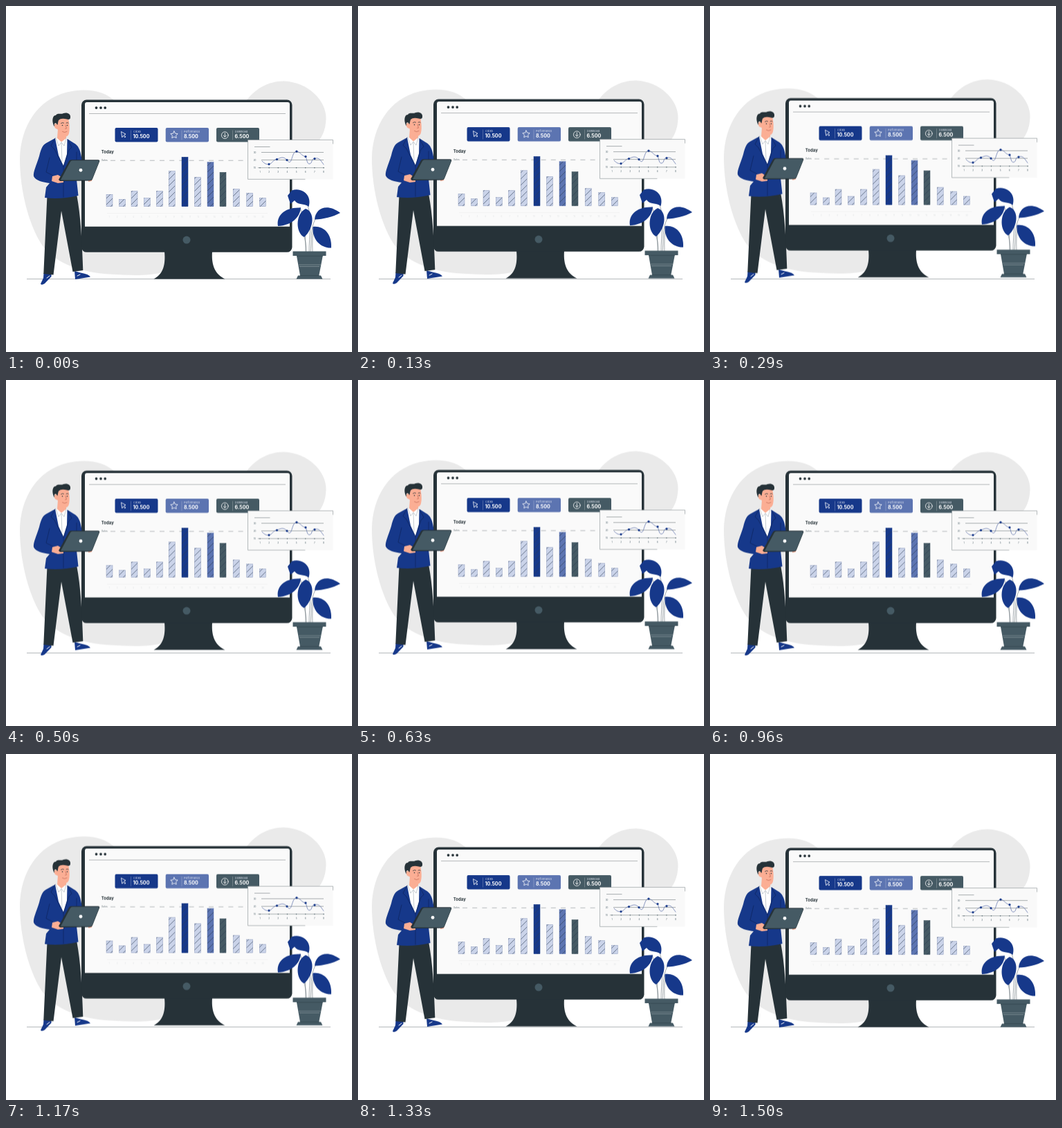
Write an HTML page that moves like this. It is 500 by 500 pixels and loops after 1540 ms.

```html
<!DOCTYPE html>
<html lang="en">
<head>
<meta charset="utf-8">
<title>Dashboard</title>
<style>
  html, body { margin: 0; width: 100%; height: 100%; overflow: hidden; background: #fff; }
  svg { display: block; width: 100vw; height: 100vh; }
  text { font-family: Inter, Roboto, sans-serif; }
  .float { animation: float 770ms cubic-bezier(.3, .12, .7, .88) -40ms infinite alternate; }
  @keyframes float {
    from { transform: translateY(.2px); }
    to { transform: translateY(-6.1px); }
  }
  .blue { fill: #16388a; }
  .dark { fill: #263238; }
  .slate { fill: #455a64; }
  .skin { fill: #fbae94; }
  .line { fill: none; stroke-linecap: round; stroke-linejoin: round; }
  .label { font-size: 3.8px; fill: #dfe4f0; }
  .value { font-size: 7.1px; font-weight: 700; fill: #fff; }
  .tiny { font-size: 3px; fill: #455a64; text-anchor: middle; }
</style>
</head>
<body>
<svg viewBox="0 0 500 500">
  <defs>
    <pattern id="hatch" width="9" height="9" patternUnits="userSpaceOnUse">
      <path d="M-1 10L10 -1M-1 1L1 -1M8 10L10 8" stroke="#2c3a50" stroke-width=".6"/>
    </pattern>
  </defs>

  <g class="float" fill="#eaeaea">
    <path d="M158 138C142 122 116 118 88 124.500C46 135 21 173 20 221C20 268 34 320 54 348C75 374 111 385 150 387.500C181 389.500 207 390 226 385L245 357V138Z"/>
    <path d="M346 139C358 120 380 108 402 108.500C436 110 463 136 462.500 163C462 180 456 191 448 200L410 240L346 200Z"/>
  </g>

  <path d="M30 394.500H469" stroke="#a3a8ab" stroke-width=".8"/>

  <g class="float">
    <!-- monitor -->
    <path class="dark" d="M229 355H298C296.500 376 303 388 316.500 394.500H213.500C226 388 231 376 229 355Z"/>
    <rect class="dark" x="109" y="135.500" width="304.500" height="220.300" rx="7.500"/>
    <path d="M114 318.800V142Q114 139 117 139H407Q410 139 410 142V318.800Z" fill="#fafafa"/>
    <circle class="slate" cx="261" cy="338" r="5.500"/>
    <g class="dark">
      <circle cx="130.500" cy="147" r="1.900"/>
      <circle cx="137" cy="147" r="1.900"/>
      <circle cx="143.200" cy="147" r="1.900"/>
    </g>
    <path d="M120 155.500H404" stroke="#989da0" stroke-width=".7"/>

    <!-- stat tiles -->
    <rect class="blue" x="157.500" y="176" width="62" height="20.500" rx="2"/>
    <rect fill="#5c74b1" x="230.700" y="176" width="62.300" height="20.500" rx="2"/>
    <rect class="slate" x="304" y="176" width="62" height="20.500" rx="2"/>
    <g class="line" stroke="#fff" stroke-width=".8">
      <path d="M166.800 181.700L173 185.200L170.500 186.300L173 189L171.800 190L169.500 187.300L168 189.500Z"/>
      <path d="M243 180.800L244.600 184.100L248.200 184.600L245.600 187.100L246.200 190.700L243 189L239.800 190.700L240.400 187.100L237.800 184.600L241.400 184.100Z"/>
      <circle cx="316.300" cy="186.700" r="4.900"/>
      <path d="M316.300 183.700V189M314.100 187L316.300 189.300L318.500 187"/>
    </g>
    <path d="M180.500 179.500V193.500M254 179.500V193.500M327.500 179.500V193.500" stroke="#fff" stroke-opacity=".4" stroke-width=".6"/>
    <text class="label" x="184" y="183.300">Clicks</text>
    <text class="label" x="257" y="183.300">Performance</text>
    <text class="label" x="331" y="183.300">Download</text>
    <text class="value" x="183.500" y="191.300">10.500</text>
    <text class="value" x="257" y="191.300">8.500</text>
    <text class="value" x="330.500" y="191.300">6.500</text>

    <!-- bar chart -->
    <text class="dark" x="137.800" y="213.300" font-size="6" font-weight="700">Today</text>
    <text x="138" y="224.300" font-size="3.400" fill="#69757b">Sales</text>
    <path d="M151 223.200H374" stroke="#6c767b" stroke-width=".5" stroke-dasharray="7 7.200"/>
    <g id="bars"></g>
    <path d="M146 299.500H378" stroke="#ececec" stroke-width=".6"/>
    <g id="days" opacity=".15"></g>

    <!-- line chart card -->
    <rect x="349.500" y="193.500" width="123" height="57" fill="#f9f9f9"/>
    <path class="line" d="M432 250.300H349.500V193.500H472.500V199" stroke="#858d91" stroke-width=".6"/>
    <path d="M359 203.500H381.500M369 211.500H459M369 222.500H459M364 233.700H460" stroke="#626c71" stroke-width=".55"/>
    <g id="axis"></g>
    <path class="line" d="M370 224C374 228 376 229 380 228.500C385 228 386 221.500 391.500 221.500C397 219 401 217 406 222.500C414 234 412 210 420 210C426 211 427 217 433 217.500C435 222 435 229 439 228C443 227 441 220 446 220.500C453 218 455 224 459 229" stroke="#5368a5" stroke-width=".7"/>
    <g id="dots" class="blue"></g>

    <!-- plant -->
    <g class="line" stroke="#657178" stroke-width=".6">
      <path d="M425 291C432 312 433 330 433 356M430 331Q434 341 434 356M436 288C443 310 438 330 438 356M447 308C439 323 442 340 440 356M445 321Q442 332 443 356"/>
    </g>
    <g class="blue">
      <path d="M407 274L413 266.500C422 263 432 267 436 274C439 279 439 285 437.500 290C430 284 423 289 417 281L411 286Z"/>
      <path d="M393 318C390 303 403 290 426 291.500C425 305 413 317 393 318Z"/>
      <path d="M433 293C446 297 446 320 431 334C419 329 417 301 433 293Z"/>
      <path d="M446 308.500C447 293 463 284 483 299C472 305 459 308 446 308.500Z"/>
      <path d="M443.500 319C458 317 471 328 470 349.500C455 350 442 338 443.500 319Z"/>
    </g>
    <path class="slate" d="M414.500 354.500H462.500V361H457.800L452.300 389.500H455L457.500 394.500H419.500L422 389.500H425L420 361H414.500Z"/>
    <path d="M420 361.300H457.800M425 389.600H452.500" stroke="#2f424b" stroke-width=".6"/>
    <path d="M423 374H455M424 376.500H453" stroke="#a4b0b5" stroke-width=".5"/>

    <!-- man -->
    <path class="blue" d="M54.500 386H65.500V391L56 401Q51 404 50 401.500L54 393ZM99 383L108 385.500Q120 387.500 122 391.500L100 395Z"/>
    <path class="line" d="M59 393L63 390M103 390L107 388" stroke="#fff" stroke-width="1"/>
    <path class="dark" d="M59.500 274L54.300 387L68.500 388.500L80 296L96.500 384L111.300 382C110 342 108 302 102 272Z"/>
    <path d="M69 191L89 191L92 232L79 234L67 220Z" fill="#fff"/>
    <path class="skin" d="M75 178L87 184V191L80 196.500L74 191Z"/>
    <path class="skin" d="M72 162H90C92 171 92.500 180 90.500 185.500Q88 190.500 82 188.500Q76 185 74.500 178Q69 177 70 171Q72 168 73.500 171Z"/>
    <path class="dark" d="M69 173C66 166 67 158 72 158C74 154 79 157 83 155C88 153 94 156 93 161C93 165 89 164 85 163Q79 162 76 165Q75 168 74.500 172L72 169Q69 169 70 174Z"/>
    <g class="dark">
      <circle cx="81.500" cy="172.500" r=".8"/>
      <circle cx="88.500" cy="172.500" r=".8"/>
    </g>
    <path class="line" d="M79.500 169.500Q81.500 167.800 83.500 169M87 169Q88.500 168 90 169" stroke="#263238" stroke-width=".8"/>
    <path class="line" d="M86 172L87.500 177L85.500 177.300M81.500 181.500Q84.500 183.700 88 181.500" stroke="#b65c48" stroke-width=".6"/>
    <path class="blue" d="M71 191L61 196.500C53 200 51 205 48 217C44 230 39 240 40 246C42 252 54 255 63 256L58 262L56 277Q78 280 104.500 274L102 251L110 225C108 208 105 202 98 198L88.500 192L88 214L83 231L76 216Z"/>
    <path class="line" d="M71 191L65 202L70 207L83 232L83 276M89 193L95 204L91 208L83 232M63 219L58 240L68 245M102 211L102 224" stroke="#0c2054" stroke-width=".6"/>
    <path class="line" d="M72 191L76 202L80 197L84 202L87 191M80 198L81 225" stroke="#8d9ba4" stroke-width=".5"/>
    <path class="skin" d="M67 246L75 244L83 249V255L75 256L66 253ZM119 248L125 247L124 253L119 254Z"/>
    <path class="dark" d="M76 251L91 224Q92 222.300 94 222.300H133Q136 222.500 135 225L125 250Q124 252.500 121 252.500L78 253Z"/>
    <path class="slate" d="M79 251.500L93 225Q94 223.200 96 223.200H133.500Q135 223.500 134.500 225L124.500 250Q124 251.500 122 251.500Z"/>
    <circle cx="108" cy="237.200" r="2.400" fill="#fff"/>
  </g>
</svg>
<script>
  const SVG = 'http://www.w3.org/2000/svg';
  function add(id, tag, attrs, text = '') {
    const el = document.createElementNS(SVG, tag);
    for (const key in attrs) el.setAttribute(key, attrs[key]);
    el.textContent = text;
    document.getElementById(id).append(el);
  }

  // left edge, top edge, fill of the strong bars
  const bars = [
    [145, 272.3], [163.5, 279.3], [181, 267.3], [199.3, 277.5], [217.5, 267.3],
    [235.2, 238.7], [254, 218.3, '#16388a'], [272.5, 247.3], [291, 225.7, '#5c74b1'],
    [309, 240.3, '#455a64'], [328.2, 264.5], [347.7, 270.3], [366.3, 277.3]
  ];
  for (const [x, y, fill] of bars) {
    const box = { x, y, width: 9, height: 289.7 - y };
    add('bars', 'rect', { ...box, fill: fill || '#cad3e9', stroke: fill || '#8e9bbd', 'stroke-width': .5 });
    add('bars', 'rect', { ...box, fill: 'url(#hatch)' });
  }

  for (let i = 0; i < 20; i++) {
    add('days', 'text', { class: 'tiny', x: 149 + i * 11.7, y: 305.5 }, i + 1);
  }

  for (let i = 0; i < 8; i++) {
    const x = 367 + i * 13.15;
    add('axis', 'circle', { cx: x, cy: 233.7, r: .7, fill: '#455a64' });
    add('axis', 'text', { class: 'tiny', x, y: 241 }, i + 1);
  }
  [30, 20, 10].forEach((n, i) => add('axis', 'text', { class: 'tiny', x: 359.5, y: 212.6 + i * 11 }, n));

  const points = [[380, 228.5], [391.5, 221.5], [406, 222.5], [420, 210], [433, 217.5], [446, 220.5]];
  points.forEach(([cx, cy]) => add('dots', 'circle', { cx, cy, r: 1.6 }));
</script>
</body>
</html>
```
